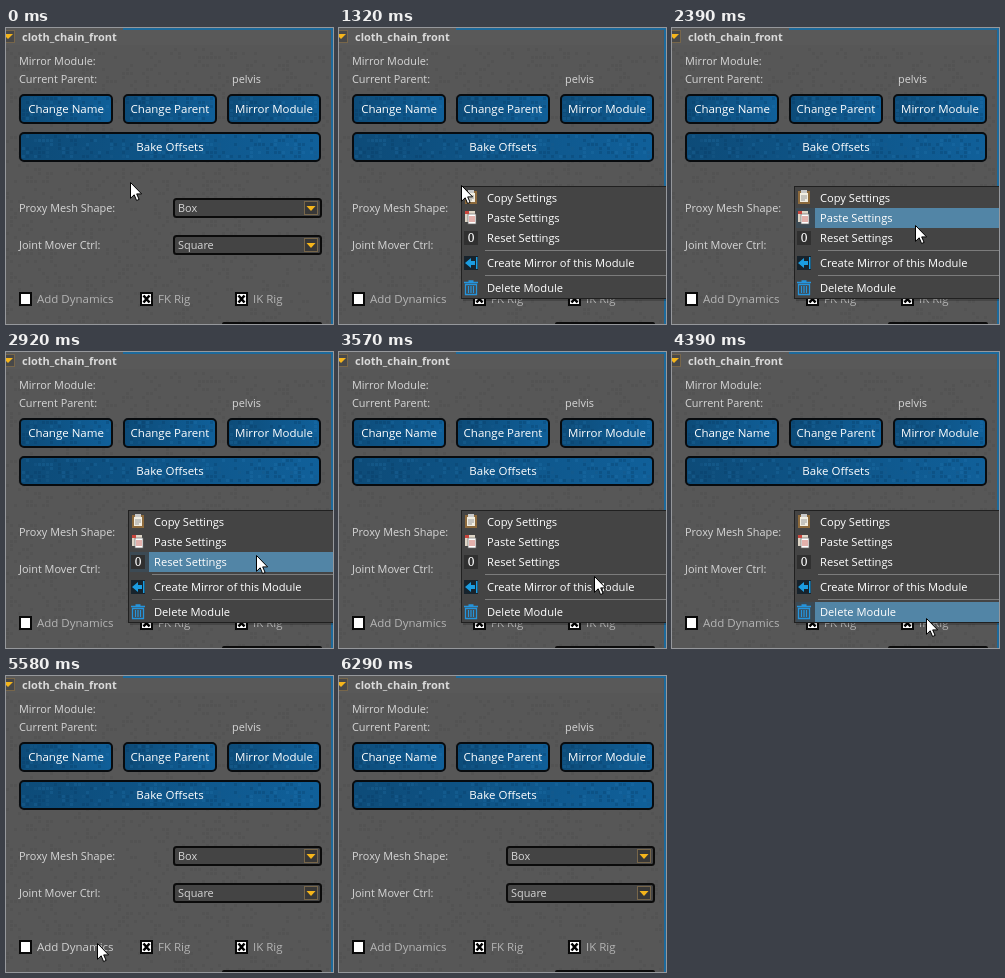
Animation, 327 px wide and 296 px high, one loop 6.39 s. Source, as an HTML page:

```html
<!DOCTYPE html>
<html lang="en">
<head>
<meta charset="utf-8">
<title>Module context menu</title>
<style>
  html, body { margin: 0; width: 100%; height: 100%; overflow: hidden; background: #575757; }
  svg { display: block; width: 327px; height: 296px; }
  text { font: 10.9px "Open Sans", "Noto Sans", sans-serif; fill: #d6d6d6; }
  .title { font-size: 11px; font-weight: 700; fill: #dadada; }
  .button { font-size: 11.5px; fill: #fff; text-anchor: middle; }
  .check { font-size: 11.5px; fill: #b4b4b4; }
  .check.hover { fill: #d0d0d0; }
  .item { font-size: 11.15px; fill: #fff; }
  .zero { font: 12px "Noto Serif", serif; fill: #fff; text-anchor: middle; }
</style>
</head>
<body>
<svg id="stage" viewBox="0 0 327 296"></svg>
<script>
const stage = document.getElementById('stage');

let seed = 7;
const random = () => (seed = seed * 16807 % 2147483647) / 2147483647;

const rect = (x, y, w, h, fill, extra = '') =>
  `<rect x="${x}" y="${y}" width="${w}" height="${h}" fill="${fill}" ${extra}/>`;
const path = (d, fill, extra = '') => `<path d="${d}" fill="${fill}" ${extra}/>`;
const text = (x, y, words, kind = '') => `<text x="${x}" y="${y}" class="${kind}">${words}</text>`;

// Scattered small tiles inside a box
function tiles(x, y, w, h, share, fill) {
  let d = '';
  for (let ty = y; ty < y + h; ty += 4)
    for (let tx = x; tx < x + w; tx += 4)
      if (random() < share) {
        const tw = Math.min(3, x + w - tx), th = Math.min(3, y + h - ty);
        d += `M${tx} ${ty}h${tw}v${th}h${-tw}z`;
      }
  return path(d, fill);
}

function button(x, y, w, h, label) {
  return rect(x + 1, y + 1, w - 2, h - 2, 'url(#blue)', 'rx="4" stroke="#080b0e" stroke-width="2"') +
    tiles(x + 3, y + 3, w - 6, h - 6, .3, '#06365c40') +
    tiles(x + 3, y + 3, w - 6, h - 6, .2, '#2c82b830') +
    text(x + w / 2, y + h / 2 + 4, label, 'button');
}

function combo(y, label) {
  return rect(168, y + 1, 147, 18, '#444', 'rx="2.5" stroke="#0b0b0b" stroke-width="2"') +
    text(172, y + 14, label) +
    rect(298.5, y + 3.5, 13, 13, '#383838', 'stroke="#77664a"') +
    path(`M300.5 ${y + 8}h9l-4.5 5z`, '#f5b51b');
}

function checkbox(x, label, checked) {
  const mark = `M${x + 3.5} 267.5l6 7m0 -7l-6 7`;
  return rect(x + 1, 265, 11, 12, '#fff', 'stroke="#080808" stroke-width="2"') +
    (checked ? path(mark, 'none', 'stroke="#000" stroke-width="2.6"') : '') +
    text(x + 18, 275, label, 'check');
}

const icons = [
  rect(126, 163, 12, 13, '#8d6a3c') + rect(128, 165, 8, 9, '#f2eee2') +
    rect(129, 162, 6, 3, '#c8c8c8') + path('M129 168h6m-6 2h6m-6 2h4', 'none', 'stroke="#999"'),
  rect(126, 183, 10, 11, '#ded5c6') + rect(129, 186, 8, 10, '#fff', 'stroke="#666" stroke-width=".7"') +
    path('M130 189h6m-6 2h6m-6 2h6', 'none', 'stroke="#c66258"') + rect(126, 183, 4, 3, '#c9463d'),
  rect(125, 203, 14, 14, '#303030') + text(132, 214, '0', 'zero'),
  rect(125, 228, 14, 14, '#17232c') + path('M126 235l6-5v3h4v4h-4v3zM137 229h1.5v12h-1.5z', '#1b9ce0'),
  path('M125 254.5h14M129.5 253h5M126.5 256.5h11v10h-11zM129.5 258v7m2.5-7v7m2.5-7v7', 'none',
    'stroke="#2594dc" stroke-width="1.3"')
];

const items = [
  [160, 'Copy Settings'], [180, 'Paste Settings'], [200, 'Reset Settings'],
  [225, 'Create Mirror of this Module'], [250, 'Delete Module']
];

const separator = y => rect(146, y, 181, 1, '#7c7c7c');

const menu = rect(124, 271, 203, 2, '#0003') +
  rect(122.5, 158.5, 210, 112, '#444', 'stroke="#202020"') +
  separator(222) + separator(247) +
  '<g id="highlight">' + rect(124, 0, 19, 20, '#3c4a54') + rect(143, 0, 184, 20, '#5285a6') + '</g>' +
  icons.join('') + items.map(([y, label]) => text(148, y + 14, label, 'item')).join('');

stage.innerHTML = `
  <defs><linearGradient id="blue" x2="1" y2="0">
    <stop stop-color="#0d4b78"/><stop offset="1" stop-color="#10609a"/>
  </linearGradient></defs>` +
  rect(0, 0, 327, 296, '#575757') +
  tiles(0, 20, 324, 276, .2, '#4f4f4f70') +
  rect(0, 0, 324, 17, '#595959') +
  path('M117 1H326V296', 'none', 'stroke="#1d6a9c" stroke-width="2"') +
  rect(-4.5, 2.5, 13, 12, '#484848', 'stroke="#77664a"') +
  path('M-3 6h10l-5 5z', '#f5b51b') +
  text(16, 13, 'cloth_chain_front', 'title') +
  text(13, 37, 'Mirror Module:') +
  text(13, 55, 'Current Parent:') +
  text(226, 55, 'pelvis') +
  button(13, 66, 94, 30, 'Change Name') +
  button(117, 66, 94, 30, 'Change Parent') +
  button(221, 66, 94, 30, 'Mirror Module') +
  button(13, 104, 302, 30, 'Bake Offsets') +
  text(13, 184, 'Proxy Mesh Shape:') + combo(170, 'Box') +
  text(13, 221, 'Joint Mover Ctrl:') + combo(207, 'Square') +
  checkbox(13, 'Add Dynamics', false) +
  checkbox(134, 'FK Rig', true) +
  checkbox(229, 'IK Rig', true) +
  rect(216, 294, 100, 4, '#0b0b0b', 'rx="2"') +
  `<g id="menu">${menu}</g>` +
  path('M.5 .5V16.3L4.2 12.8 6.6 18.5 9.1 17.4 6.7 11.9H11.6z', '#fff',
    'id="cursor" stroke="#000" stroke-width="1"');

const [menuBox, highlight, cursor] = ['menu', 'highlight', 'cursor'].map(id => document.getElementById(id));
const dynamicsLabel = stage.querySelector('.check');

const LOOP = 6390, MENU_OPEN = 820, MENU_CLOSE = 5260;
const START = [124, 154];
const easeOut = p => 1 - (1 - p) ** 2;
const moves = [
  { from: 680, till: 820, steps: 4, to: [120, 156] },
  { from: 1320, till: 1520, steps: 8, to: [136, 165] },
  { from: 1830, till: 2450, steps: 22, to: [244, 197], ease: easeOut },
  { from: 2500, till: 2650, steps: 5, to: [250, 197] },
  { from: 2810, till: 3010, steps: 7, to: [250, 207] },
  { from: 3310, till: 3680, steps: 11, to: [257, 230] },
  { from: 4110, till: 4390, steps: 11, to: [254, 266] },
  { from: 4760, till: 5110, steps: 13, to: [64, 247], bend: [180, 300] },
  { from: 5500, till: 5700, steps: 8, to: [135, 300] }
];

function cursorAt(time) {
  let at = START;
  for (const { from, till, steps, to, bend, ease = p => p } of moves) {
    if (time < from) break;
    const step = Math.floor((time - from) / (till - from) * (steps - 1) + 1e-6) + 1;
    const p = ease(Math.min(1, step / steps));
    at = at.map((a, i) => {
      const middle = bend ? bend[i] : (a + to[i]) / 2;
      return (1 - p) ** 2 * a + 2 * p * (1 - p) * middle + p * p * to[i];
    });
  }
  return at.map(Math.round);
}

const show = (node, visible) => node.setAttribute('visibility', visible ? 'inherit' : 'hidden');

function draw(now) {
  const time = now % LOOP;
  const [x, y] = cursorAt(time);
  const open = time >= MENU_OPEN && time < MENU_CLOSE;
  const row = items.find(([top]) => x >= 122 && y >= top && y < top + 20);
  show(menuBox, open);
  show(highlight, open && row);
  if (row) highlight.setAttribute('transform', `translate(0 ${row[0]})`);
  dynamicsLabel.classList.toggle('hover', x < 109 && y >= 262 && y < 278);
  cursor.setAttribute('transform', `translate(${x} ${y})`);
}

const begin = performance.now();
function tick() {
  draw(performance.now() - begin);
  requestAnimationFrame(tick);
}
tick();
</script>
</body>
</html>
```
